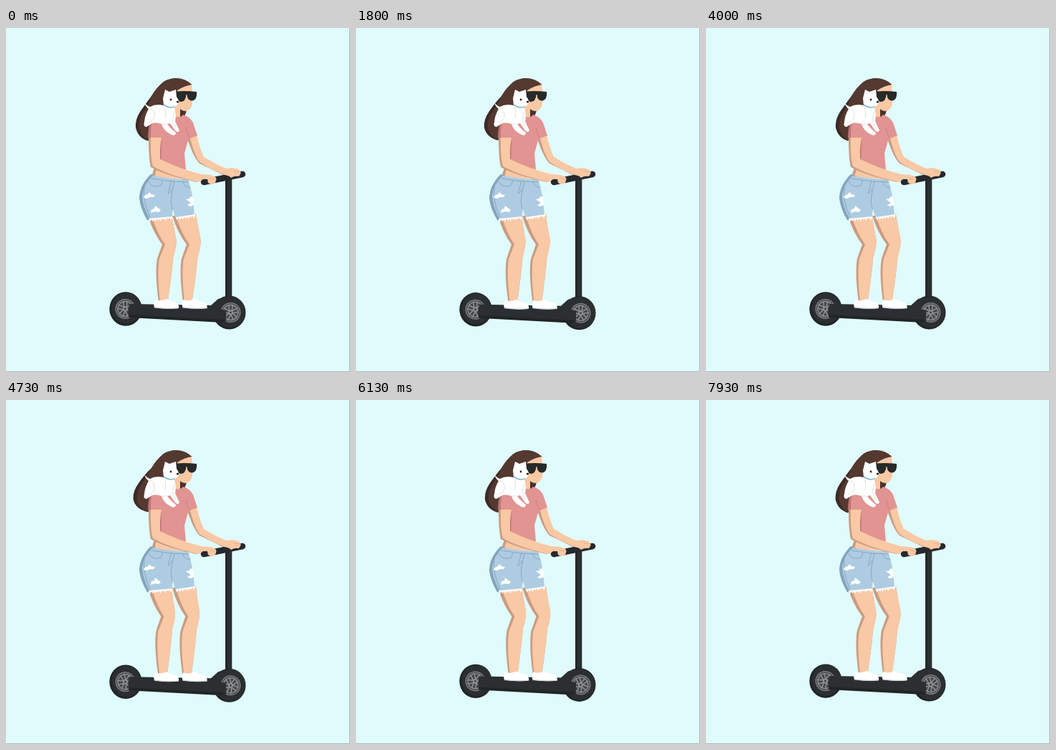
Write an HTML page that moves like this. It is 480 px wide and 480 px high and loops after 8000 ms.

```html
<!DOCTYPE html>
<html lang="en">
<head>
<meta charset="utf-8">
<title>Scooter ride</title>
<style>
html, body { margin: 0; width: 100%; height: 100%; overflow: hidden; background: #e0fbfc; }
svg { display: block; width: 100vw; height: 100vh; }
.skin { fill: #f9c8a4; }
.shade { fill: #c99c82; }
.metal { fill: #2b2f32; }
.dark { fill: #212527; }
.white { fill: #fff; }
.seam { fill: none; stroke: #7b9db7; stroke-width: .8; }
.fur { fill: none; stroke: #d3d9dc; stroke-width: .8; }
</style>
</head>
<body>
<svg viewBox="0 0 480 480">
  <defs>
    <g id="rim">
      <circle r="14" fill="#797d7f"/>
      <circle r="12.5" fill="#424648"/>
      <circle r="10.5" fill="none" stroke="#8d9193" stroke-width="1.3"/>
      <g id="spokes" fill="none" stroke="#8d9193" stroke-width="1.6"></g>
      <circle r="3.4" fill="#8d9193"/>
      <circle r="1.4" fill="#34383a"/>
    </g>
  </defs>
  <path d="M479.5 0V479.5H0" fill="none" stroke="#aab7b8"/>

  <!-- hair -->
  <path id="hairShade" fill="#3d2a26"/>
  <path id="hair" fill="#543931"/>
  <path d="M242 110H252.5Q252 120 247 125L242 126Z" fill="#4b322b"/>

  <!-- head and neck -->
  <path class="skin" d="M234 86L259 78Q260 87 260 98V105Q259 115 250 116Q246 116 243 113V126L230 130L232 104Z"/>
  <path d="M219 76Q243 63 259.5 79Q250 80 239 87L236 108L218 112L210 87Z" fill="#543931"/>
  <path d="M237 88.5Q252 87.5 266 89Q267 101 259 101.5Q253 101 252.5 93H251.5Q251 103 243 103Q237 101 237 88.5Z" fill="#262a29"/>

  <!-- legs -->
  <path id="farShade" class="shade"/>
  <path id="farLeg" class="skin"/>
  <path id="nearShade" class="shade"/>
  <path id="nearLeg" class="skin"/>

  <!-- waist and shorts -->
  <path class="shade" d="M208 192L217 192L214 207L203 207Z"/>
  <path class="skin" d="M211 193L250 194L252 211L207 208Z"/>
  <path d="M202 204L210 207L202 269L197 268Q188 253 186 238Q186 220 202 204Z" fill="#83a4bc"/>
  <path d="M205 206Q230 211 254 211Q261 230 263 262L237 266L233 253L231 265L201 268Q190 248 190 233Q192 218 205 206Z" fill="#aecce1"/>
  <path class="seam" d="M203 210Q230 215 255 215M231 213L226 231M235 214L231 233Q229 242 232 253M226 231Q230 230 231 224M199 214Q204 224 216 220L219 213M247 215Q249 223 257 222M193 221Q190 240 201 264"/>
  <path class="white" d="M193 234L198 232L200 229L203 232L208 233L206 236L201 236L197 238L192 237ZM203 253L207 252L208 248L212 251L216 254L213 257L208 256L202 258ZM251 239L256 238L257 235L261 236L262 247L257 249L253 247L258 244Z"/>
  <path id="fringe" class="white"/>

  <!-- scooter -->
  <path class="metal" d="M306 207H315.3V390H306Z"/>
  <path class="dark" d="M306 207H308.5V390H306Z"/>
  <g id="base">
    <ellipse cx="167" cy="392" rx="22.7" ry="23.7" class="dark"/>
    <ellipse cx="168" cy="391" rx="20.5" ry="21.5" class="metal"/>
    <g transform="translate(166.5 392)"><use class="spin" href="#rim"/></g>
    <ellipse cx="311.5" cy="397" rx="23" ry="23.5" class="dark"/>
    <ellipse cx="313" cy="396.5" rx="21" ry="22" class="metal"/>
    <g transform="translate(313.5 397)"><use class="spin" href="#rim"/></g>
    <path class="metal" d="M173 385L286 387L296 378L305 376Q299 384 299 392L307 394V410L172 403Q168 394 173 385Z"/>
    <path class="dark" d="M171 400L305 407L303 411L171 404Z"/>
    <g id="shoe">
      <path class="white" d="M208 379Q215 382 224 378Q229 381 238 383Q242 387 241 391Q224 393 207 390Q205 384 208 379Z"/>
      <path d="M207 389Q224 391.5 241 390V391.3Q224 393 207 390.5Z" fill="#d2d9dc"/>
    </g>
    <use href="#shoe" x="39.5"/>
  </g>

  <!-- far arm and handlebar -->
  <path class="shade" d="M252 151L260 151L266 175L306 203L303 205L270 189Q261 180 252 151Z"/>
  <path class="skin" d="M256 151L266 149Q270 167 276 180Q292 190 309 197L307 205Q288 199 270 187Q263 178 256 151Z"/>
  <path d="M276 215L330 204" stroke="#26292c" stroke-width="8.5" stroke-linecap="round"/>
  <path class="skin" d="M305 197Q315 193.5 324 197Q328 199 327.5 203L325 207Q319 206 314 209Q312 206 305 205Z"/>

  <!-- shirt -->
  <path d="M211 124L218 150L220 194L216 195L213 154L198 153Q198 139 202 130Z" fill="#bd7475"/>
  <path d="M212 124Q222 128 233 122Q242 127 247 121Q257 124 261 132L267 150L257 154L254 157L249 175L251 197Q232 199 216 194L217 153L202 153Q201 139 205 129Z" fill="#e19491"/>
  <path d="M256 153Q252 147 251 139" fill="none" stroke="#c97c7b" stroke-width=".9"/>

  <!-- near arm -->
  <path class="shade" d="M199 153L207 153L206 189L268 212L266 215Q220 205 202 194Q199 182 199 153Z"/>
  <path class="skin" d="M202 153H217Q214 171 215 183Q241 196 272 204L285 205Q294 207 293.5 211L292 216Q287 220 282 216L281 211H275L269 215Q228 206 205 193Q201 181 202 153Z"/>
  <path d="M284 210L292 211M318 200L326 201" stroke="#dba483" stroke-width=".7"/>

  <!-- dog -->
  <path class="white" d="M193 104Q197 109 201 110Q209 105 220 108L219 98L222 86L228 89L237 86L238 96Q242 101 241 105Q238 109 235 111Q238 122 236 130L242 143Q240 147 236 143L229 133L225 134Q229 140 237 146Q237 151 231 149Q220 144 217 134Q209 131 204 133L196 138Q191 138 193 131Q194 121 199 113Q195 110 193 104Z"/>
  <path class="fur" d="M201 112Q208 115 207 124Q205 131 197 132M217 134L223 134M235 117L232 128L237 139M221 110Q224 117 222 126"/>
  <path d="M220 107Q228 113 236 109.5" fill="none" stroke="#91bacb" stroke-width="1.8"/>
  <circle cx="230" cy="100" r="1.4" fill="#292525"/>
  <ellipse cx="239.5" cy="103" rx="1.7" ry="1.5" fill="#292525"/>
</svg>
<script>
const byId = id => document.getElementById(id);
const setPath = (id, d) => byId(id).setAttribute('d', d);
const FPS = 15, LOOP = 8000;

byId('spokes').innerHTML = Array.from({ length: 5 }, (_, i) =>
  `<path d="M-1.7 -2L-2.8 -11M1.7 -2L2.8 -11" transform="rotate(${i * 72})"/>`).join('');

// Frayed hem: a row of uneven threads between two points.
function hem(x1, y1, x2, y2, count) {
  let d = `M${x1} ${y1 - 1}`;
  for (let i = 0; i <= count * 2; i++) {
    const p = i / count / 2;
    const drop = i % 2 ? 2 + 2.5 * Math.abs(Math.sin(i * 2.3)) : .3;
    d += `L${x1 + (x2 - x1) * p} ${y1 + (y2 - y1) * p + drop}`;
  }
  return d + `L${x2} ${y2 - 1}Z`;
}
setPath('fringe', hem(199, 267, 232, 264, 9) + hem(237, 265, 264, 261, 7));

function hairPath(sway, inset) {
  const x = 181 - sway + inset;
  return `M259 79Q239 64 220 75Q210 83 203 95
    Q${196 - sway * .9 + inset} 104 ${187 - sway * .8 + inset} 117
    Q${x - 1} 128 ${x} 139Q${x + 3} ${153 - sway * .3} ${198 - sway * .2 + inset * .4} ${157.5 - sway * .4}
    L206 151L214 126L238 108Z`;
}

// bend pushes the knee forward, drop lowers the foot, shade widens the back edge.
function legPath(x, bend, drop, shade) {
  const knee = x + bend, shin = x + bend * .8, ankle = x + bend * .4;
  return `M${x + 203 - shade} 262L${x + 231} 260Q${knee + 231} 278 ${knee + 234.5} 295
    Q${knee + 235.5} 303 ${shin + 231} 319Q${shin + 229} 344 ${ankle + 224} ${384 + drop}
    H${ankle + 214 - shade * .4}Q${shin + 208 - shade * .6} 342 ${shin + 211.5 - shade * .6} 322
    L${knee + 219 - shade * .8} 302Q${x + 209 - shade + bend * .5} 286 ${x + 203 - shade} 262Z`;
}

const wheels = document.querySelectorAll('.spin');
function draw(now) {
  const turn = Math.floor(now % LOOP * FPS / 1000 + .06) / FPS;
  const swing = (1 - Math.cos(turn * 2 * Math.PI)) / 2;
  const sway = 6 * swing, drop = 2.3 * swing, bend = 3 * (1 - swing);
  setPath('hairShade', hairPath(sway, 0));
  setPath('hair', hairPath(sway, 5));
  for (const [leg, x] of [['near', 0], ['far', 34]]) {
    setPath(leg + 'Shade', legPath(x, bend, drop, 5));
    setPath(leg + 'Leg', legPath(x, bend, drop, 0));
  }
  byId('base').setAttribute('transform', `translate(0 ${drop})`);
  wheels.forEach(w => w.setAttribute('transform', `rotate(${turn * 360})`));
  requestAnimationFrame(() => draw(performance.now() - start));
}
const start = performance.now();
draw(0);
</script>
</body>
</html>
```
